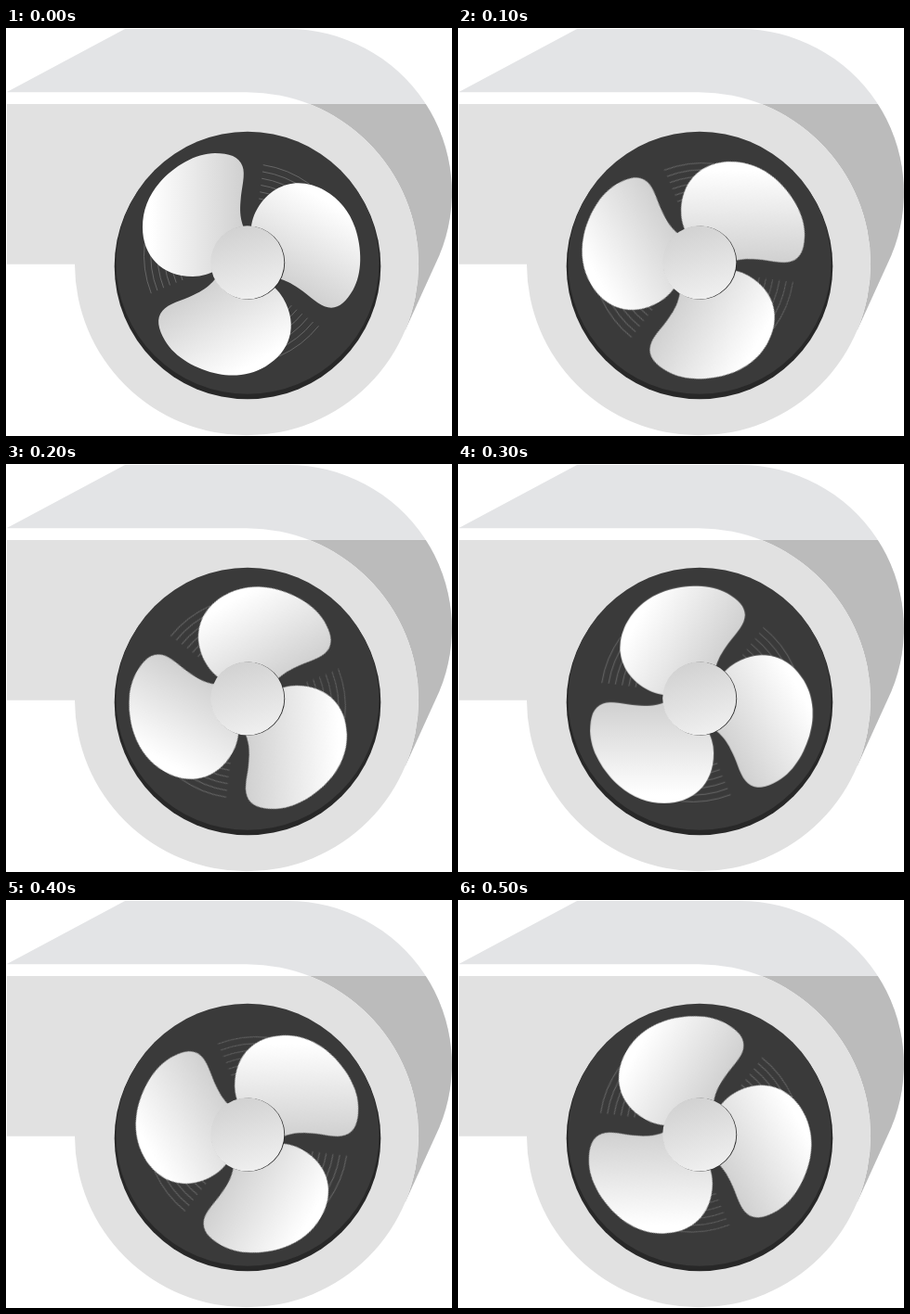
Write an HTML page that moves like this. It is 480x440 px and loops after 0.6 s.

```html
<!DOCTYPE html>
<html lang="en">
<head>
<meta charset="utf-8">
<title>Blower fan</title>
<style>
  html, body { margin: 0; width: 100%; height: 100%; overflow: hidden; background: #fff; }
  svg { display: block; width: 100%; height: 100%; }
  #fan { transform-origin: 260px 252.8px; }
</style>
</head>
<body>
<svg viewBox="0 0 480 440">
  <defs>
    <linearGradient id="metal" gradientUnits="userSpaceOnUse" x1="156" y1="200" x2="256" y2="200">
      <stop offset="0" stop-color="#fff"/>
      <stop offset="1" stop-color="#d0d0d0"/>
    </linearGradient>
    <linearGradient id="cap" x1="0.35" y1="0" x2="0.65" y2="1">
      <stop offset="0" stop-color="#d1d1d1"/>
      <stop offset="1" stop-color="#f0f0f0"/>
    </linearGradient>
    <clipPath id="low"><rect y="82" width="480" height="358"/></clipPath>
    <path id="back" d="M1 69 L128 1 H303.5 A176.5 176.5 0 0 1 466.3 245.3 L429.6 326 L259 254 Z"/>
    <path id="front" d="M1 69.3 H259 A185 185 0 1 1 74 254.7 H1 Z"/>
    <path id="blade" fill="url(#metal)" d="M258 224 C256 212 250.5 208 252.5 186 C253.5 172 258 158 254.5 149
      C251 138.5 240 135 225 135 C204 135 181 149 165.5 166.5 C153 181 147 197 147 215
      C147 245 167 268 201 268 C211 268 219 265 227 261 Z"/>
  </defs>

  <use href="#back" fill="#e3e4e6"/>
  <use href="#back" fill="#bbb" clip-path="url(#low)"/>
  <use href="#front" fill="#fff"/>
  <use href="#front" fill="#e1e1e1" clip-path="url(#low)"/>

  <circle cx="260" cy="257" r="143.3" fill="#282828"/>
  <circle cx="260" cy="253.3" r="141.5" fill="#3a3a3a"/>

  <g id="fan"></g>

  <circle cx="260.6" cy="253.1" r="39.6" fill="#222"/>
  <circle cx="259.8" cy="252.8" r="39.6" fill="url(#cap)"/>
</svg>
<script>
  const NS = "http://www.w3.org/2000/svg";
  const fan = document.getElementById("fan");
  // The blade set sits slightly off the axle, so it wobbles as it turns.
  const CX = 256.5, CY = 251.7;

  function add(name, attrs) {
    const el = document.createElementNS(NS, name);
    for (const key in attrs) el.setAttribute(key, attrs[key]);
    fan.append(el);
  }

  function polar(r, deg) {
    const a = deg * Math.PI / 180;
    return (CX + r * Math.cos(a)).toFixed(2) + " " + (CY + r * Math.sin(a)).toFixed(2);
  }

  const turns = [0, 120, 240];

  // Faint air streaks in the gaps between blades
  for (const turn of turns) {
    for (let i = 0; i < 6; i++) {
      const r = 106 - 7.3 * i;
      add("path", {
        d: `M${polar(r, turn - 79 + i * 0.4)} A${r + 8} ${r + 8} 0 0 1 ${polar(r + 3, turn - 50)}`,
        fill: "none", stroke: "#6c6c6c", "stroke-width": 0.9
      });
    }
  }
  for (const turn of turns) {
    add("use", { href: "#blade", transform: `rotate(${turn} ${CX} ${CY})` });
  }

  // Held poses in degrees, 100 ms each
  const poses = [0, -30, -60, -90, -150, -330];
  const keys = poses.map((deg, i) => ({
    offset: i / poses.length, transform: `rotate(${deg}deg)`, easing: "steps(1, end)"
  }));
  keys.push({ offset: 1, transform: "rotate(-360deg)" });
  fan.animate(keys, { duration: 600, iterations: Infinity });
</script>
</body>
</html>
```
